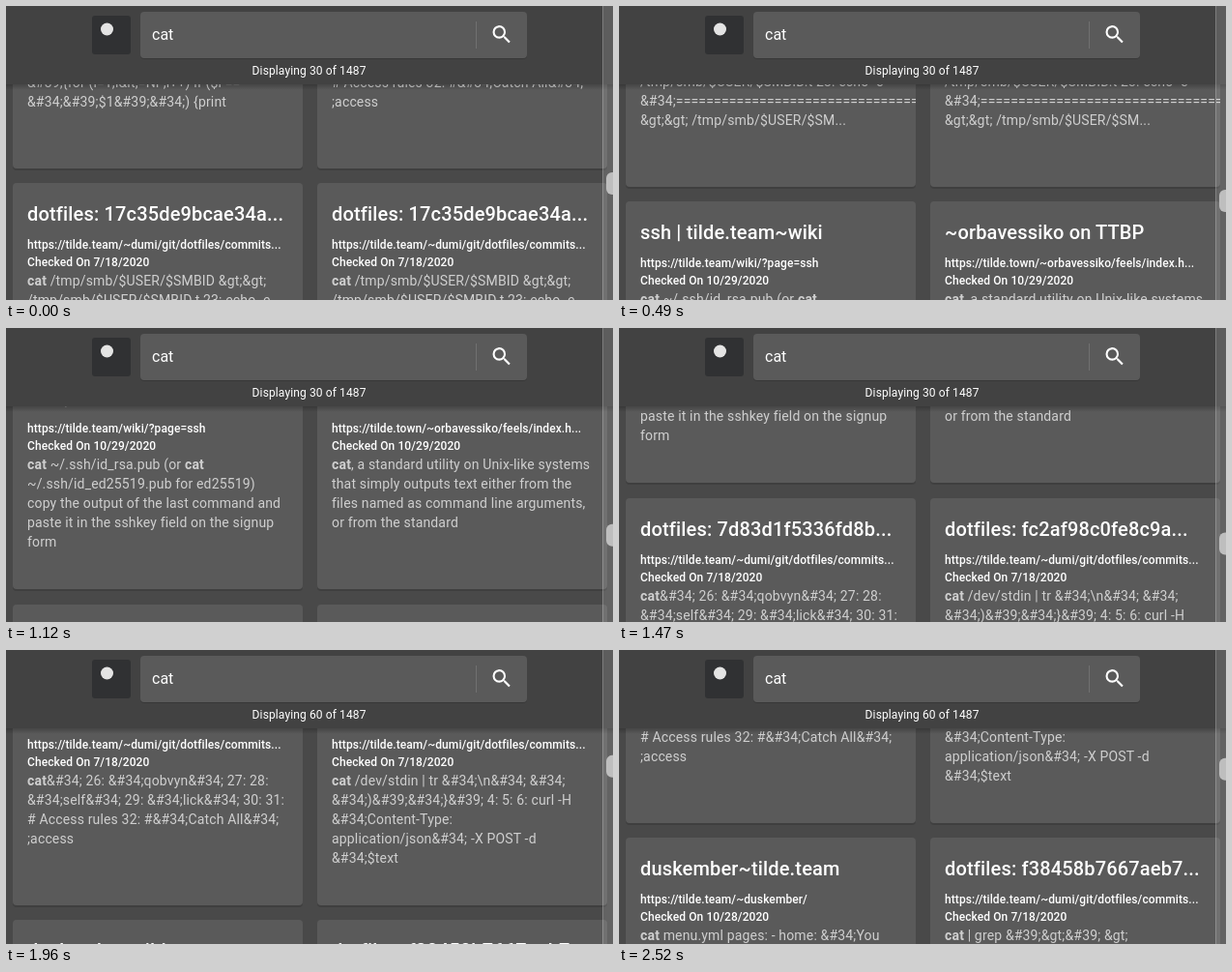
Recreate the animation shown at these times as an HTML page. Size 628 px wide and 304 px high, loop 2940 ms.

```html
<!DOCTYPE html>
<html lang="en">
<head>
<meta charset="utf-8">
<title>Search results</title>
<style>
  html, body { margin: 0; width: 100%; height: 100%; overflow: hidden; background: #494949; }
  svg { display: block; width: 100%; height: 100%; font-family: Roboto, sans-serif; fill: #fff; }
  .title { font-size: 20px; font-weight: 500; letter-spacing: .15px; }
  .meta { font-size: 12px; font-weight: 500; letter-spacing: .08px; }
  .body { font-size: 14px; letter-spacing: .16px; fill: #cfcfcf; }
  .body .hit { font-weight: 700; }
  .count { font-size: 12px; letter-spacing: .12px; }
  .query { font-size: 16px; }
</style>
</head>
<body>
<svg viewBox="0 0 628 304">
  <defs>
    <linearGradient id="fade" x2="0" y2="1">
      <stop offset="0" stop-color="#000" stop-opacity=".26"/>
      <stop offset="1" stop-color="#000" stop-opacity="0"/>
    </linearGradient>
    <clipPath id="cardClip"><rect width="300" height="230" rx="4"/></clipPath>
  </defs>
  <rect width="628" height="304" fill="#494949"/>
  <g id="list"></g>

  <rect y="80" width="628" height="7" fill="url(#fade)"/>
  <rect width="628" height="81" fill="#424242"/>
  <rect x="89" y="10" width="40" height="40" rx="3" fill="#303133"/>
  <circle cx="104.5" cy="24" r="6.5" fill="#e4e4e4"/>
  <rect x="139" y="7" width="400" height="48" rx="4" fill="#000" opacity=".16"/>
  <rect x="139" y="6" width="400" height="48" rx="4" fill="#5a5a5a"/>
  <text class="query" x="151" y="35">cat</text>
  <rect x="486" y="16" width="1" height="28" fill="#707070"/>
  <path transform="translate(500.4 17) scale(1.04)" d="M15.5 14h-.79l-.28-.27A6.47 6.47 0 0 0 16 9.5 6.5 6.5 0 1 0 9.5 16c1.61 0 3.09-.59 4.23-1.57l.27.28v.79l5 4.99L20.49 19zm-6 0C7.01 14 5 11.99 5 9.5S7.01 5 9.5 5 14 7.01 14 9.5 11.99 14 9.5 14z"/>
  <text class="count" id="count" x="313.6" y="71" text-anchor="middle"></text>

  <rect x="617" width="11" height="304" opacity=".14"/>
  <rect x="617" width="1" height="304" opacity=".2"/>
  <rect id="thumb" x="621" width="16" height="23" rx="6" fill="#bebebe"/>
</svg>
<script>
const STEP = 70, LOOP = 2940, LAST = 36, MORE = 25;
const COMMITS = 'https://tilde.team/~dumi/git/dotfiles/commits...';
const JULY = '7/18/2020';

const smb = ['dotfiles: 17c35de9bcae34a...', COMMITS, JULY,
  'cat /tmp/smb/$USER/$SMBID &gt;&gt;',
  '/tmp/smb/$USER/$SMBID.t 23: echo -e',
  '&#34;' + '='.repeat(36),
  '&gt;&gt; /tmp/smb/$USER/$SM...'];
const rules = ['# Access rules 32: #&#34;Catch All&#34;', ';access'];

// Pairs of cards, each: title, address, date, body lines
const rows = [
  [['', '', '', '', '', '&#39;{for (i=1;i&lt;=NF;i++) if ($i ==',
    '&#34;&#39;$1&#39;&#34;) {print'],
  ['', '', '', '', '', ...rules]],

  [smb, smb],

  [['ssh | tilde.team~wiki', 'https://tilde.team/wiki/?page=ssh', '10/29/2020',
    'cat ~/.ssh/id_rsa.pub (or cat',
    '~/.ssh/id_ed25519.pub for ed25519)',
    'copy the output of the last command and',
    'paste it in the sshkey field on the signup',
    'form'],
  ['~orbavessiko on TTBP', 'https://tilde.town/~orbavessiko/feels/index.h...', '10/29/2020',
    'cat, a standard utility on Unix-like systems',
    'that simply outputs text either from the',
    'files named as command line arguments,',
    'or from the standard']],

  [['dotfiles: 7d83d1f5336fd8b...', COMMITS, JULY,
    'cat&#34; 26: &#34;qobvyn&#34; 27: 28:',
    '&#34;self&#34; 29: &#34;lick&#34; 30: 31:',
    ...rules],
  ['dotfiles: fc2af98c0fe8c9a...', COMMITS, JULY,
    'cat /dev/stdin | tr &#34;\\n&#34; &#34;',
    '&#34;)&#39;&#34;}&#39; 4: 5: 6: curl -H',
    '&#34;Content-Type:',
    'application/json&#34; -X POST -d',
    '&#34;$text']],

  [['duskember~tilde.team', 'https://tilde.team/~duskember/', '10/28/2020',
    'cat menu.yml pages: - home: &#34;You'],
  ['dotfiles: f38458b7667aeb7...', COMMITS, JULY,
    'cat | grep &#39;&gt;&#39; &gt;']]
];

const $ = id => document.getElementById(id);

function add(parent, tag, attrs, text) {
  const el = document.createElementNS('http://www.w3.org/2000/svg', tag);
  for (const k in attrs) el.setAttribute(k, attrs[k]);
  if (text) el.textContent = text;
  return parent.appendChild(el);
}

function addCard(x, y, [title, url, date, ...lines]) {
  const g = add($('list'), 'g', { transform: `translate(${x} ${y})` });
  const box = { width: 300, height: 230, rx: 4 };
  add(g, 'rect', { ...box, y: 2, fill: '#000', opacity: .14 });
  add(g, 'rect', { ...box, fill: '#5a5a5a' });
  const inner = add(g, 'g', { 'clip-path': 'url(#cardClip)' });
  const put = (cls, base, text) => add(inner, 'text', { class: cls, x: 15, y: base }, text);
  put('title', 39, title);
  put('meta', 68, url);
  if (date) put('meta', 86, 'Checked On ' + date);
  lines.forEach((line, i) => {
    const text = put('body', 106 + 20 * i);
    for (const part of line.split(/\b(cat)\b/))
      if (part) add(text, 'tspan', part === 'cat' ? { class: 'hit' } : {}, part);
  });
}

rows.forEach((cards, r) => {
  const top = Math.round(-62.3 + 245.33 * r);
  cards.forEach((card, c) => addCard(7 + 315 * c, top, card));
});

// Scroll distance at a few steps, joined by a monotone cubic
const keys = [[0, 0], [4, 146], [10, 291], [16, 388], [25, 585], [32, 697], [36, 725]];
const rate = keys.slice(1).map(([n, s], i) => (s - keys[i][1]) / (n - keys[i][0]));
const slope = keys.map((_, i) => {
  const a = rate[Math.max(i - 1, 0)], b = rate[Math.min(i, rate.length - 1)];
  return 2 * a * b / (a + b);
});

function scrollAt(n) {
  let i = 0;
  while (i < keys.length - 2 && n >= keys[i + 1][0]) i++;
  const [n0, s0] = keys[i], [n1, s1] = keys[i + 1];
  const w = n1 - n0, u = (n - n0) / w, v = 1 - u;
  return Math.round(s0 * v * v * (1 + 2 * u) + s1 * u * u * (3 - 2 * u)
    + w * u * v * (slope[i] * v - slope[i + 1] * u));
}

function draw(ms) {
  const n = Math.min(LAST, Math.floor(ms % LOOP / STEP));
  const s = scrollAt(n), more = n >= MORE;
  $('list').setAttribute('transform', `translate(0 ${-s})`);
  $('count').textContent = `Displaying ${more ? 60 : 30} of 1487`;
  $('thumb').setAttribute('y', more ? 107 + (s - 585) * .034 : 172 + s * .0795);
}

const start = performance.now();
function tick() {
  draw(performance.now() - start);
  requestAnimationFrame(tick);
}
tick();
</script>
</body>
</html>
```
